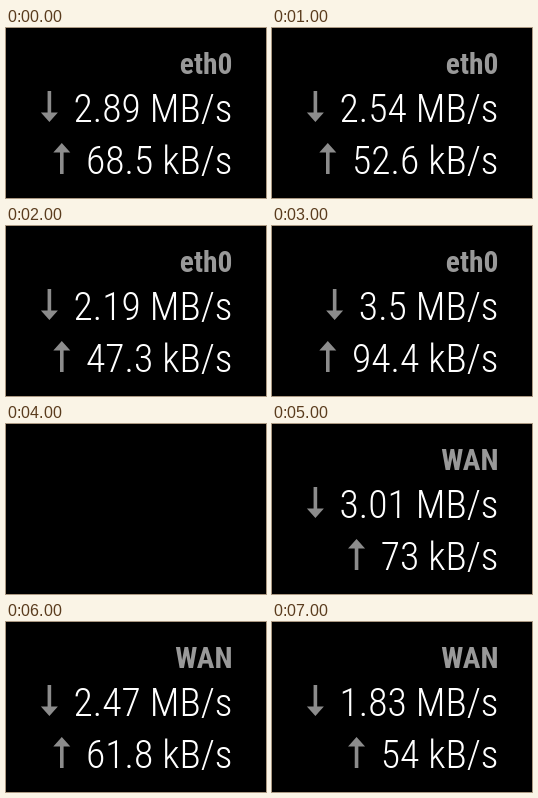
An HTML page that plays this animation: 260 by 170 pixels, repeating every 8000 ms.

```html
<!DOCTYPE html>
<html lang="en">
<head>
<meta charset="utf-8">
<title>Network traffic</title>
<style>
  html, body { margin: 0; width: 100%; height: 100%; overflow: hidden; background: #000; }
  svg { display: block; width: 260px; height: 170px; }
  text {
    font: 300 39.65px "Roboto Condensed", Roboto, sans-serif;
    font-stretch: condensed;
    text-anchor: end;
    fill: #fff;
  }
  #name { font-size: 29.5px; font-weight: 700; fill: #999; }
  .arrow { fill: #8c8c8c; }
</style>
</head>
<body>
<svg viewBox="0 0 260 170">
  <defs>
    <path id="arrow" d="M-1.8-15.5h3.6V6H8.5L0 15.5-8.5 6h6.7z"/>
  </defs>
  <g id="panel">
    <text id="name" y="46"></text>
    <use class="arrow" id="downArrow" href="#arrow"/>
    <text id="down" y="94"></text>
    <use class="arrow" id="upArrow" href="#arrow"/>
    <text id="up" y="146"></text>
  </g>
</svg>
<script>
  const STEP = 1000, RIGHT = 226.5, ARROW_GAP = 24.2, ARROW_RISE = 15.5;

  // One reading per second: interface, download MB/s, upload kB/s; null is blank.
  const readings = [
    ["eth0", "2.89", "68.5"],
    ["eth0", "2.54", "52.6"],
    ["eth0", "2.19", "47.3"],
    ["eth0", "3.5", "94.4"],
    null,
    ["WAN", "3.01", "73"],
    ["WAN", "2.47", "61.8"],
    ["WAN", "1.83", "54"]
  ];

  const el = id => document.getElementById(id);

  function write(id, text) {
    const node = el(id);
    node.textContent = text;
    node.setAttribute("x", RIGHT);
    return node;
  }

  function writeRate(id, text, flip) {
    const node = write(id, text);
    const x = RIGHT - node.getComputedTextLength() - ARROW_GAP;
    const y = node.getAttribute("y") - ARROW_RISE;
    el(id + "Arrow").setAttribute("transform", `translate(${x} ${y}) scale(1 ${flip})`);
  }

  let shown = -1;
  function draw() {
    const index = Math.floor(performance.now() / STEP) % readings.length;
    if (index !== shown) {
      shown = index;
      const reading = readings[index];
      el("panel").style.visibility = reading ? "visible" : "hidden";
      if (reading) {
        const [name, down, up] = reading;
        write("name", name);
        writeRate("down", down + " MB/s", 1);
        writeRate("up", up + " kB/s", -1);
      }
    }
    requestAnimationFrame(draw);
  }
  draw();
</script>
</body>
</html>
```
